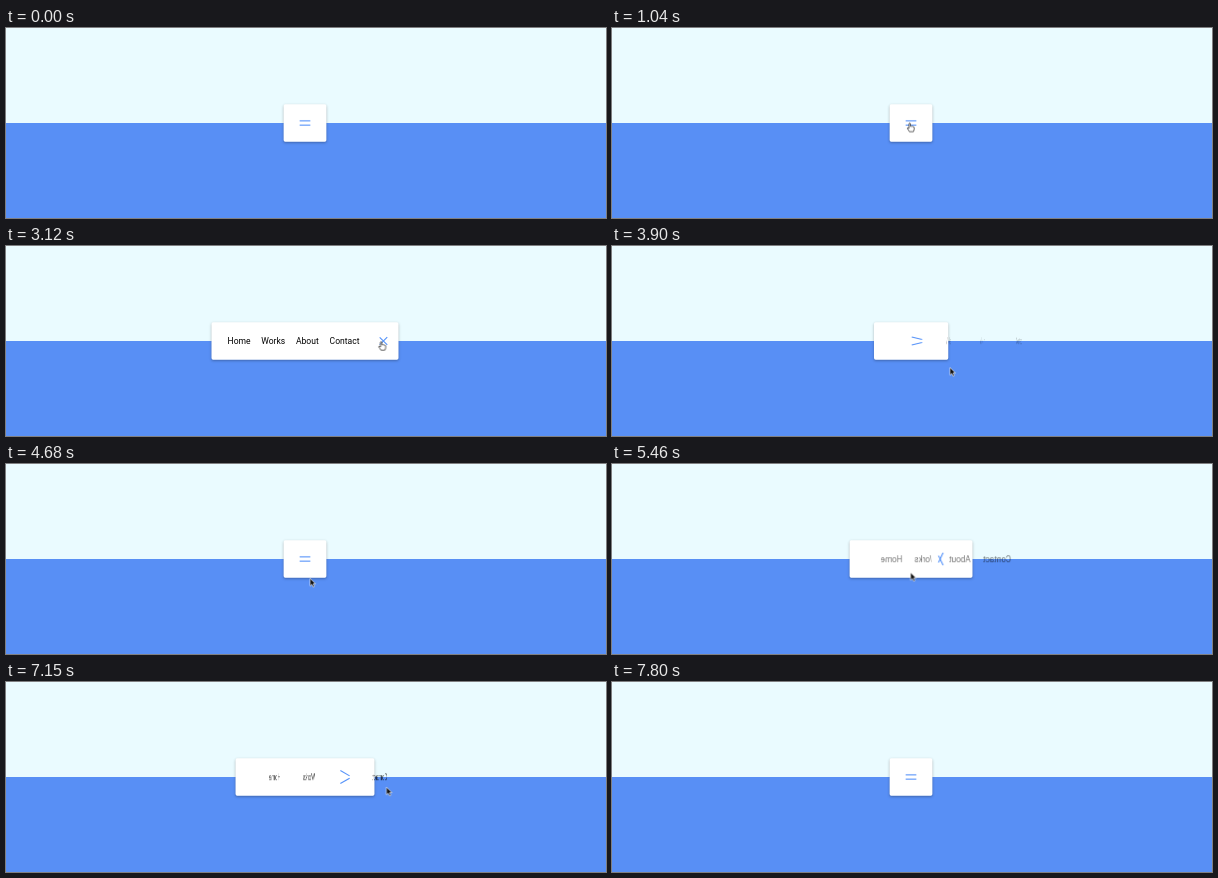
Write an HTML page that moves like this. It is 600x190 px and loops after 8320 ms.

```html
<!DOCTYPE html>
<html lang="en">
<head>
<meta charset="utf-8">
<title>Animated navigation</title>
<style>
  @property --open { syntax: "<number>"; inherits: true; initial-value: 0; }
  @property --hand { syntax: "<number>"; inherits: true; initial-value: 0; }

  * { box-sizing: border-box; }
  html, body { margin: 0; width: 100%; height: 100%; overflow: hidden; }
  body {
    position: relative;
    background: linear-gradient(#eafbff 50%, #588ff5 50%);
    font: 16px Roboto, sans-serif;
  }

  nav {
    position: absolute;
    left: 298.5px;
    top: 94.9px;
    width: calc(80px + 270px * var(--open));
    padding: 20px;
    display: flex;
    align-items: center;
    justify-content: center;
    background: #fff;
    border-radius: 3px;
    box-shadow: 0 2px 5px rgba(0, 0, 0, .3);
    transform: translate(-50%, -50%) scale(.5343);
    animation: toggle 8320ms linear infinite;
  }
  ul {
    display: flex;
    width: calc(100% * var(--open));
    margin: 0;
    padding: 0;
    list-style: none;
  }
  li {
    padding: 0 10px;
    opacity: var(--open);
    transform: rotateY(calc(360deg * var(--open)));
  }
  .icon {
    position: relative;
    width: 30px;
    height: 30px;
    background: #fff;
  }
  .line {
    position: absolute;
    left: 5px;
    top: 10px;
    width: 20px;
    height: 2px;
    background: #5290f9;
    transform: rotate(calc(-765deg * var(--open))) translateY(calc(5.5px * var(--open)));
  }
  .line + .line {
    top: 18px;
    transform: rotate(calc(765deg * var(--open))) translateY(calc(-5.5px * var(--open)));
  }

  .cursor {
    position: absolute;
    left: 0;
    top: 0;
    width: 12px;
    height: 12px;
    overflow: visible;
    animation: move 8320ms ease-in-out infinite, hover 8320ms step-end infinite;
  }
  .arrow { opacity: calc(1 - var(--hand)); }
  .hand { opacity: var(--hand); }

  @keyframes toggle {
    0%, 14.495% { --open: 0; }
    21.707%, 41.226% { --open: 1; }
    48.438%, 61.623% { --open: 0; }
    68.834%, 83.534% { --open: 1; }
    90.745%, 100% { --open: 0; }
  }
  @keyframes move {
    0%, 5.3% { transform: translate(430px, 198px); }
    12.5%, 15.4% { transform: translate(298px, 95.5px); }
    20.3% { transform: translate(309px, 122.5px); }
    23.5%, 28.9% { transform: translate(310px, 133px); }
    37.5%, 42% { transform: translate(375.5px, 96px); }
    50.8%, 52.6% { transform: translate(312px, 139px); }
    59.37%, 62.3% { transform: translate(298px, 95.5px); }
    65.6% { transform: translate(298.5px, 108.5px); }
    69.7%, 72.6% { transform: translate(308px, 133px); }
    80.8%, 84.2% { transform: translate(375.5px, 96px); }
    92.5%, 100% { transform: translate(430px, 198px); }
  }
  @keyframes hover {
    0% { --hand: 0; }
    10.9% { --hand: 1; }
    17% { --hand: 0; }
    35.5% { --hand: 1; }
    43.5% { --hand: 0; }
    57.5% { --hand: 1; }
    64% { --hand: 0; }
    79.5% { --hand: 1; }
    85.5% { --hand: 0; }
  }
</style>
</head>
<body>
<nav>
  <ul>
    <li>Home</li>
    <li>Works</li>
    <li>About</li>
    <li>Contact</li>
  </ul>
  <div class="icon"><div class="line"></div><div class="line"></div></div>
</nav>

<svg class="cursor" viewBox="0 0 12 12">
  <path class="arrow" d="M0 0V7.6L1.8 6 3 8.7 4.4 8.1 3.2 5.5H5.6Z"
        fill="#111" stroke="#fff" stroke-width=".6"/>
  <path class="hand" d="M-1 0Q-.3-.8.4 0V2.8Q1.2 2.2 1.8 3 2.6 2.5 3.1 3.3 4 3 4.2 4V5.8Q4 7 3.4 8.2H-.6Q-1.2 6.8-2.6 5.2-2.9 4.2-1.9 4.3L-1 5.1Z"
        fill="#fff" stroke="#222" stroke-width=".7"/>
</svg>

<script>
  const TICK = 130, LOOP = 8320;
  const start = performance.now();
  const anims = document.getAnimations();
  anims.forEach(a => a.pause());

  function draw() {
    const t = (performance.now() - start + 1) % LOOP;
    const held = Math.floor(t / TICK) * TICK;
    anims.forEach(a => { a.currentTime = held; });
    requestAnimationFrame(draw);
  }
  draw();
</script>
</body>
</html>
```
